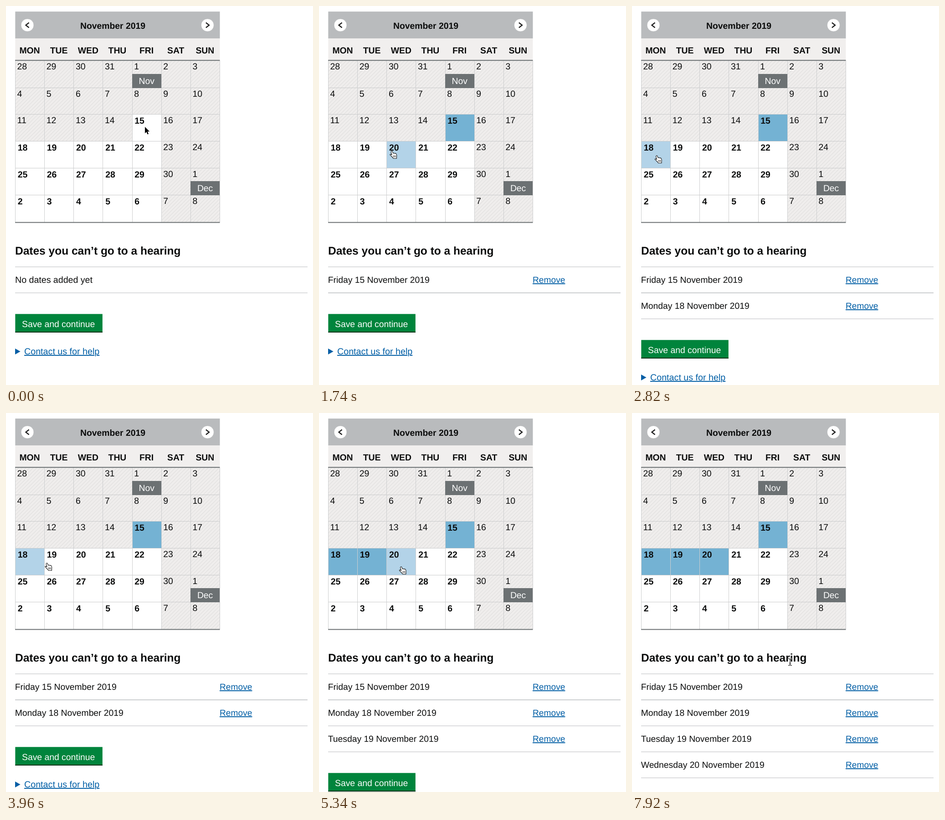
Recreate the animation shown at these times as an HTML page. Size 674 by 831 pixels, loop 8000 ms.

```html
<!DOCTYPE html>
<html lang="en">
<head>
<meta charset="utf-8">
<title>Hearing dates</title>
<style>
html, body { margin: 0; width: 100%; height: 100%; overflow: hidden; background: #fff; }
svg { display: block; font: 19.35px "Liberation Sans", Arial, sans-serif; fill: #0b0c0c; text-rendering: geometricPrecision; }
.b { font-weight: 700; }
.mid { text-anchor: middle; }
.link { fill: #005ea5; text-decoration: underline; text-decoration-thickness: 1.4px; }
.white { fill: #fff; }
.slate { fill: #6c7173; }
.rule { fill: #bfc1c3; }
</style>
</head>
<body>
<svg id="stage" width="674" height="831" viewBox="0 0 674 831">
  <defs>
    <pattern id="hatch" width="8" height="8" x="20" y="120" patternUnits="userSpaceOnUse">
      <rect width="8" height="8" fill="#efedec"/>
      <path d="M-1 9L9 -1M-1 1L1 -1M7 9L9 7" stroke="#d8d7d6" stroke-width=".9"/>
    </pattern>
  </defs>
</svg>
<script>
const LOOP = 8000, STEP = 60;
const COL = 64.15, LEFT = 20.4;
const ROWS = [120, 179.5, 238, 297, 356, 415, 474];
const DARK_BLUE = '#74b2d3', LIGHT_BLUE = '#b3d3e8';
const stage = document.getElementById('stage');

function add(tag, attrs, parent = stage, content) {
  const el = document.createElementNS('http://www.w3.org/2000/svg', tag);
  for (const k in attrs) el.setAttribute(k, attrs[k]);
  if (content !== undefined) el.textContent = content;
  parent.appendChild(el);
  return el;
}
const box = (x, y, width, height, style, parent) => add('rect', { x, y, width, height, ...style }, parent);
const rule = (y, parent) => box(20, y, 642, 1.1, { class: 'rule' }, parent);
const label = (x, y, str, cls = '', parent, extra) => add('text', { x, y, class: cls, ...extra }, parent, str);
const show = (el, on) => el.setAttribute('visibility', on ? 'visible' : 'hidden');
const colX = c => LEFT + c * COL;

// Calendar head
box(20.3, 12.2, 449.2, 59, { fill: '#b9bbbd' });
box(20.3, 71, 449.2, 48, { fill: '#f1efee' });
label(234.5, 50, 'November 2019', 'b mid');
for (const [x, d] of [[47, 1], [442.4, -1]]) {
  add('circle', { cx: x, cy: 42, r: 14, class: 'white', stroke: '#a9abad', 'stroke-width': .6 });
  add('path', {
    d: `M${x + 3.5 * d} 36.5L${x - 3.5 * d} 42L${x + 3.5 * d} 47.5`,
    fill: 'none', stroke: '#222', 'stroke-width': 2.4
  });
}
['MON', 'TUE', 'WED', 'THU', 'FRI', 'SAT', 'SUN'].forEach((d, i) =>
  label(colX(i) + 31.6, 104, d, 'b mid'));

// Calendar cells: day 0 is 28 October
const isOpen = (r, c) => c < 5 && (r > 2 || r === 2 && c === 4);
const dayOf = i => i < 4 ? 28 + i : i < 34 ? i - 3 : i - 33;
const cells = [];
box(20, 120, 449.5, 354, { fill: 'url(#hatch)' });
for (let i = 0; i < 42; i++) {
  const r = Math.floor(i / 7), c = i % 7;
  if (isOpen(r, c))
    cells[i] = box(colX(c), ROWS[r], COL, ROWS[r + 1] - ROWS[r], { fill: '#fff' });
}
for (let r = 1; r < 6; r++) box(20, Math.round(ROWS[r]) - 1, 449.5, 1, { fill: '#cacbcc' });
for (let c = 0; c < 8; c++) box(Math.floor(colX(c)), 120, 1, 354, { fill: '#cdcecf' });
for (let i = 0; i < 42; i++) {
  const r = Math.floor(i / 7), c = i % 7, open = isOpen(r, c);
  label(colX(c) + (open ? 5.3 : 4.2), Math.round(ROWS[r] + (open ? 20 : 19.4)), dayOf(i), open ? 'b' : '');
}
for (const [name, c, y] of [['Nov', 4, 149], ['Dec', 6, 384]]) {
  box(Math.round(colX(c)), y, 64, 31, { class: 'slate' });
  label(colX(c) + 31.8, y + 22.4, name, 'white mid');
}
box(20, 118.2, 449.5, 2, { class: 'slate' });
box(20, 473.6, 449.5, 2, { class: 'slate' });

// Chosen dates
label(20, 545, 'Dates you can\u2019t go to a hearing', 'b', stage, { 'font-size': 24.5 });
rule(571.4);
rule(628.4);
const empty = label(20, 607, 'No dates added yet', '', stage, { 'font-size': 19.6 });
const picks = [
  [960, 18, 'Friday'], [2520, 21, 'Monday'], [4980, 22, 'Tuesday'], [5880, 23, 'Wednesday']
].map(([at, cell, name], i) => {
  const row = add('g', {});
  const y = 57 * i;
  label(19.8, y + 607, `${name} ${dayOf(cell)} November 2019`, '', row, { 'font-size': 19.3 });
  label(469, y + 607, 'Remove', 'link', row, { 'font-size': 19.2 });
  rule(y + 628.4, row);
  return { at, cell, row };
});

const foot = add('g', {});
box(20.3, 675.3, 191.5, 40.7, { fill: '#00843c' }, foot);
box(20.3, 714, 191.5, 2, { fill: '#063419' }, foot);
label(35, 704, 'Save and continue', 'white', foot);
add('path', { d: 'M20 751L31.5 757.5L20 764Z', fill: '#005ea5' }, foot);
label(40, 764, 'Contact us for help', 'link', foot, { 'font-size': 19.7 });

// Pointers
const arrow = add('g', {}), hand = add('g', {}), beam = add('g', {});
add('path', {
  d: 'M0 0V14.2L3.3 11L5.6 16.4L8 15.4L5.8 10.2H10.2Z',
  fill: '#000', stroke: '#fff', 'stroke-width': 1.6, 'paint-order': 'stroke'
}, arrow);
add('path', {
  d: 'M3.6 1.6C4.6 .6 5.8 1 6.3 2.2L7.8 6C8.3 5.4 9.6 5.3 10.2 6.2C10.9 5.6 12 5.7 12.5 6.6' +
     'C13.4 6.1 14.6 6.6 15 7.9C15.7 10 16.1 12 15.4 14V17.2H8C7.6 15.5 5.2 13.6 3.4 11.8' +
     'C2 10.5 .8 10 .9 8.9C1.2 7.8 2.8 8 3.8 8.8L5 9.6L3.3 4C3 3 3 2.2 3.6 1.6Z',
  fill: '#fff', stroke: '#111', 'stroke-width': 1.1, 'stroke-linejoin': 'round'
}, hand);
add('path', { d: 'M8.6 10.6V14.6M10.8 10.6V14.6M13 10.6V14.6', stroke: '#111', 'stroke-width': .9 }, hand);
for (const [stroke, width] of [['#fff', 2.6], ['#111', 1.2]])
  add('path', {
    d: 'M-4 -7.5Q0 -7.5 0 -5Q0 -7.5 4 -7.5M0 -5V5M-4 7.5Q0 7.5 0 5Q0 7.5 4 7.5M-2 2.5H2',
    fill: 'none', stroke, 'stroke-width': width
  }, beam);

// Hot spot of the pointer: time, x, y
const PATH = [
  [0, 305, 265], [1560, 305, 265], [1620, 295, 268], [1680, 206, 304], [1740, 159, 318],
  [1920, 94, 326], [2280, 53.5, 328], [3900, 53.5, 328], [3960, 89, 329], [4140, 95, 336],
  [4500, 100, 341], [5100, 100, 341], [5340, 179.5, 337], [7620, 179.5, 337], [7680, 181, 342],
  [7740, 186, 369], [7800, 235, 420], [7860, 300, 490], [7920, 347, 546], [LOOP, 347, 546]
];
function spot(t) {
  const k = Math.max(1, PATH.findIndex(p => p[0] >= t));
  const [t0, x0, y0] = PATH[k - 1], [t1, x1, y1] = PATH[k];
  const u = (t - t0) / (t1 - t0);
  return [x0 + (x1 - x0) * u, y0 + (y1 - y0) * u];
}
function cellAt([x, y]) {
  const r = ROWS.findIndex((top, i) => y >= top && y < ROWS[i + 1]);
  const c = Math.floor((x - LEFT) / COL);
  return r < 0 || c < 0 || c > 6 ? -1 : r * 7 + c;
}

function draw(time) {
  const t = Math.floor((time % LOOP) / STEP) * STEP;
  const [x, y] = spot(t);
  // The highlight trails the pointer by one step
  const hover = t < 420 ? -1 : cellAt(spot(t - STEP));
  const chosen = picks.filter(p => t >= p.at);

  cells.forEach((el, i) => el.setAttribute('fill',
    i === hover ? LIGHT_BLUE : chosen.some(p => p.cell === i) ? DARK_BLUE : '#fff'));
  picks.forEach(p => show(p.row, t >= p.at));
  show(empty, !chosen.length);
  foot.setAttribute('transform', `translate(0 ${57 * Math.max(0, chosen.length - 1)})`);

  const kind = t < 420 || t === 7860 ? arrow : t >= 7920 ? beam : hand;
  for (const el of [arrow, hand, beam]) show(el, el === kind);
  kind.setAttribute('transform', kind === hand ? `translate(${x - 4} ${y - 1})` : `translate(${x} ${y})`);
}

let start;
function tick(now) {
  if (start === undefined) start = now;
  draw(now - start);
  requestAnimationFrame(tick);
}
draw(0);
requestAnimationFrame(tick);
</script>
</body>
</html>
```
